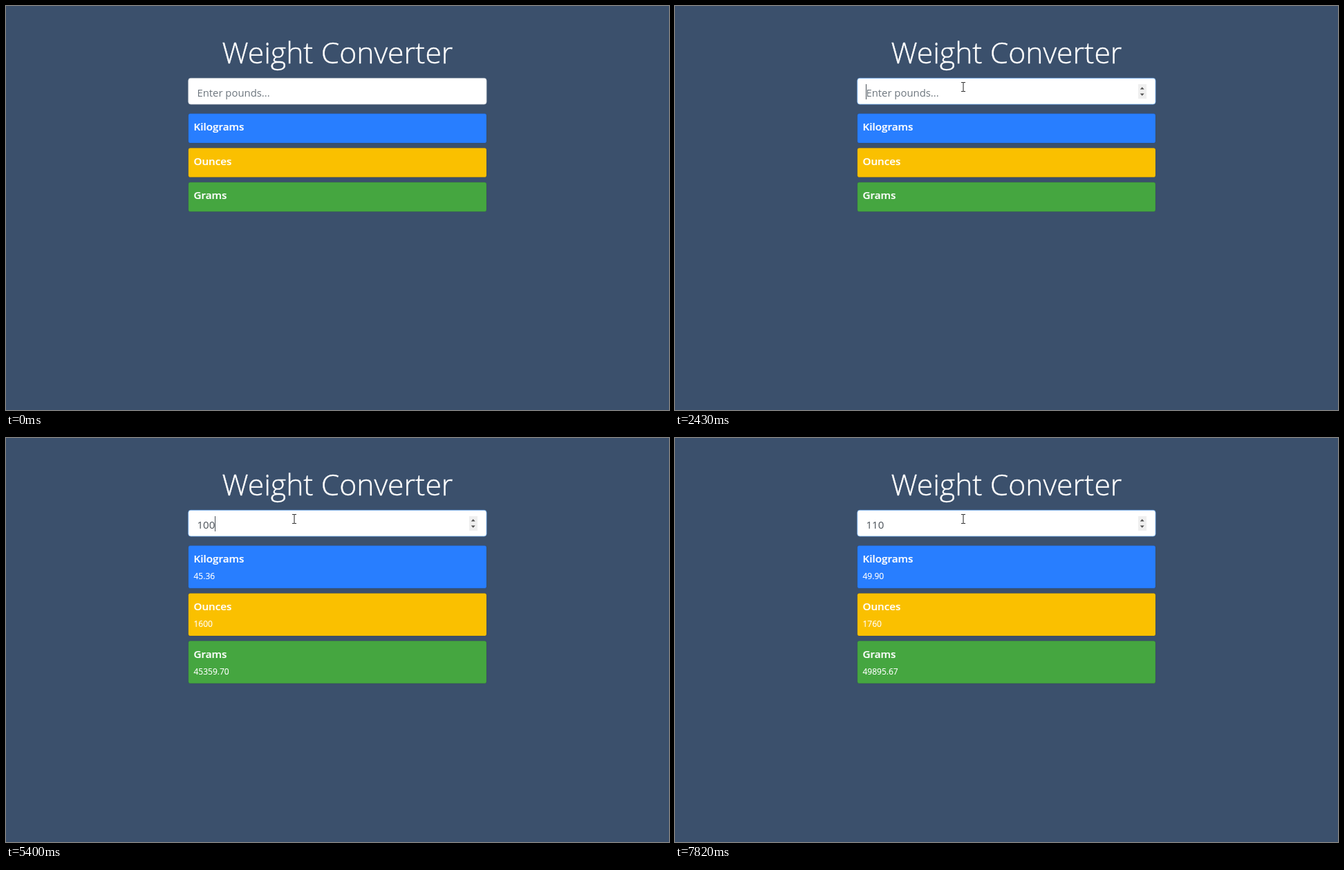
These frames come from a looping animation (959x584 px, 8000 ms). An HTML page:

```html
<!DOCTYPE html>
<html lang="en">
<head>
<meta charset="utf-8">
<title>Weight Converter</title>
<style>
  html, body { margin: 0; width: 100%; height: 100%; overflow: hidden; background: #3b506c; }
  svg { display: block; width: 959px; height: 584px; font-family: "Open Sans", "Noto Sans", sans-serif; }
  rect { stroke-width: .8; }
  .title { font-size: 42.7px; font-weight: 300; fill: #fff; stroke: #fff; stroke-width: .4; text-anchor: middle; }
  .card rect { stroke: rgba(0, 0, 0, .125); }
  .card text { fill: #fff; }
  .label { font-size: 15.2px; font-weight: 600; stroke: #fff; stroke-width: .2; }
  .value { font-size: 12px; stroke: #fff; stroke-width: .15; }
  #hint { font-size: 14.85px; fill: #6c757d; }
  #entry { font-size: 15px; fill: #495057; }
</style>
</head>
<body>
<svg viewBox="0 0 959 584">
  <text class="title" x="479.5" y="83.3">Weight Converter</text>
  <rect id="field" x="263.8" y="104.4" width="431.2" height="37.6" rx="3.4" fill="#fff"/>
  <text id="hint" x="276.5" y="130.5">Enter pounds...</text>
  <text id="entry" x="276.5" y="130.5"></text>
  <rect id="caret" y="113" width="1" height="22" fill="#495057"/>
  <g id="spinner">
    <rect x="670" y="113" width="12" height="21" fill="#efefef"/>
    <path d="M672.7 120.5h6l-3-3.2zM672.7 126.5h6l-3 3.2z" fill="#505050"/>
  </g>
  <g id="cards"></g>
  <path id="arrow" d="M.5 .5V13.2L3.3 10.6 5.3 15.3 7.2 14.5 5.2 9.8H9z" fill="#fff" stroke="#111" stroke-width=".9"/>
  <path id="beam" d="M-3 -6.5H-.8L0 -6 .8 -6.5H3M0 -6V6M-3 6.5H-.8L0 6 .8 6.5H3" fill="none" stroke="#333" stroke-width="1.1"/>
</svg>
<script>
const LOOP = 8000;
const FOCUS = 1380;
const POUNDS_PER_KILO = 2.2046;
const CARET_X = [276, 285, 294, 302];
const CARDS_TOP = 155.2;
const CARD_GAP = 6.4;
const BORDER = .8;

// Each timeline is a list of [start time, ...state].
const pointer = [
  [0, ''],
  [260, 'arrow', 833, 550], [310, 'arrow', 740, 490], [360, 'arrow', 660, 437],
  [410, 'arrow', 629, 398], [460, 'arrow', 670, 373],
  [720, 'arrow', 529, 259], [770, 'arrow', 488, 197], [820, 'arrow', 461, 152],
  [870, 'beam', 447, 124], [1100, 'beam', 447, 140], [1140, 'beam', 430, 126],
  [1180, 'beam', 417, 117]
];
const typing = [
  [0, ''], [2530, '1'], [3500, '10'], [4340, '100'],
  [5780, '10'], [5895, '1'], [6900, '11'], [7260, '110']
];
const blinking = [
  [0, false], [FOCUS, true], [1920, false], [2430, true], [3040, false],
  [3500, true], [4010, false], [4340, true], [4850, false], [5400, true],
  [6010, false], [6440, true], [7820, false]
];
const border = [
  [0, '#ced4da'], [FOCUS, '#b4cce6'], [1445, '#9ac4f3'], [1510, '#80bdff']
];
const units = [
  ['Kilograms', '#287eff', lb => (lb / POUNDS_PER_KILO).toFixed(2)],
  ['Ounces', '#fac000', lb => String(lb * 16)],
  ['Grams', '#45a640', lb => (lb / POUNDS_PER_KILO * 1000).toFixed(2)]
];

const $ = id => document.getElementById(id);
const stateAt = (timeline, t) => timeline.findLast(([start]) => start <= t).slice(1);
const show = (el, visible) => el.setAttribute('visibility', visible ? 'visible' : 'hidden');

$('cards').innerHTML = units.map(([name, color]) => `<g class="card">
  <rect x="263.8" y=".4" width="431.2" rx="2.8" fill="${color}"/>
  <text class="label" x="271.5" y="25">${name}</text>
  <text class="value" x="271.5" y="49"></text></g>`).join('');
const cards = [...$('cards').children];

function drawCards(entry) {
  const height = entry ? 62.4 : 43.2;
  cards.forEach((card, i) => {
    card.setAttribute('transform', `translate(0 ${CARDS_TOP + i * (height + CARD_GAP)})`);
    card.querySelector('rect').setAttribute('height', height - BORDER);
    card.querySelector('.value').textContent = entry ? units[i][2](+entry) : '';
  });
}

function drawPointer(t) {
  const [shape, x, y] = stateAt(pointer, t);
  for (const id of ['arrow', 'beam']) {
    show($(id), id === shape);
    if (id === shape) $(id).setAttribute('transform', `translate(${x} ${y})`);
  }
}

function draw() {
  const t = performance.now() % LOOP;
  const [entry] = stateAt(typing, t);
  $('entry').textContent = entry;
  show($('hint'), !entry);
  $('caret').setAttribute('x', CARET_X[entry.length]);
  show($('caret'), stateAt(blinking, t)[0]);
  show($('spinner'), t >= FOCUS);
  $('field').setAttribute('stroke', stateAt(border, t)[0]);
  drawCards(entry);
  drawPointer(t);
  requestAnimationFrame(draw);
}
draw();
</script>
</body>
</html>
```
